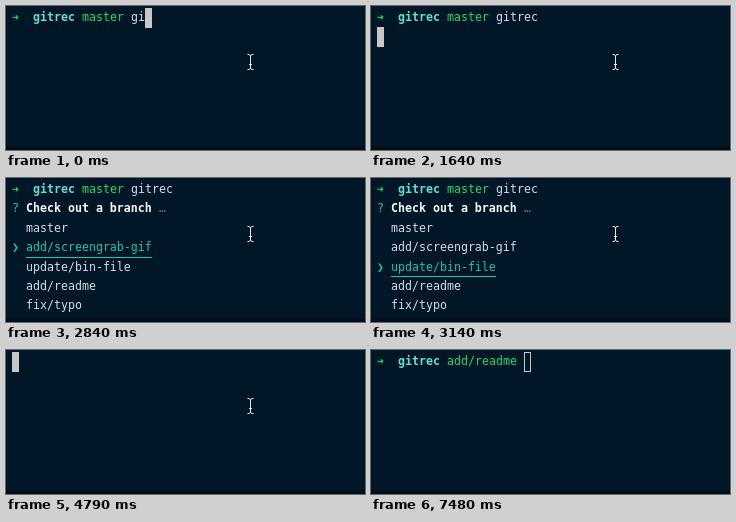
Write an HTML page that moves like this. It is 359 px wide and 144 px high and loops after 7580 ms.

```html
<!DOCTYPE html>
<html lang="en">
<head>
<meta charset="utf-8">
<title>Branch picker in a terminal</title>
<style>
  html, body { margin: 0; width: 100%; height: 100%; overflow: hidden; background: #011627; }
  svg { display: block; width: 359px; height: 144px; }
  text { font: 11.627px "DejaVu Sans Mono", "Liberation Mono", monospace; white-space: pre; fill: #d6deeb; }
  .bold { font-weight: bold; }
  .green { fill: #22da6e; }
  .cyan { fill: #66dfce; }
  .teal { fill: #21c7a8; }
  .white { fill: #f4f7fa; }
  .gray { fill: #6a737d; }
  .block { fill: #c7c7c7; }
  .hollow { fill: none; stroke: #c7c7c7; }
  #pointer { fill: none; stroke: #e6e9ec; }
</style>
</head>
<body>
<svg viewBox="0 0 359 144">
  <rect width="359" height="144" fill="#011627"/>
  <rect y="140" width="359" height="4" fill="#000d1b"/>
  <g id="screen"></g>
  <g id="pointer">
    <path d="M0.5 .5H2Q3.5 .8 3.5 2.5Q3.5 .8 5 .5H6.5M3.5 2V14M0.5 15.5H2Q3.5 15.2 3.5 13.5Q3.5 15.2 5 15.5H6.5M2 10.5H5"/>
  </g>
</svg>
<script>
const LOOP = 7580, LEFT = 6, CELL = 7, ROW = 19.4;
const branches = ["master", "add/screengrab-gif", "update/bin-file", "add/readme", "fix/typo"];
const screenEl = document.getElementById("screen");
const pointerEl = document.getElementById("pointer");

const colX = col => LEFT + col * CELL;

const put = (col, row, str, cls = "") =>
  `<text x="${colX(col)}" y="${15 + row * ROW}" class="${cls}">${str}</text>`;

const cursor = (col, row = 0) =>
  `<rect class="block" x="${colX(col)}" y="${Math.floor(2 + row * ROW)}" width="7" height="20"/>`;

const hollowCursor = col =>
  `<rect class="hollow" x="${colX(col) + 0.5}" y="2.5" width="6" height="19"/>`;

const prompt = (branch, cmd = "") =>
  put(0, 0, "➜", "bold green") + put(3, 0, "gitrec", "bold cyan") +
  put(10, 0, branch, "green") + put(11 + branch.length, 0, cmd);

const typed = n => prompt("master", "gitrec".slice(0, n));
const typing = n => typed(n) + cursor(17 + n);

function menu(selected) {
  const list = branches.map((name, i) => {
    const row = i + 2;
    if (i !== selected) return put(2, row, name);
    const y = Math.floor(21.2 + row * ROW);
    return put(0, row, "❯", "teal") + put(2, row, name, "teal") +
      `<rect class="teal" x="${colX(2)}" y="${y}" width="${name.length * CELL}" height="1"/>`;
  });
  return typed(6) + put(0, 1, "?", "teal") +
    put(2, 1, "Check out a branch", "bold white") + put(21, 1, "…", "gray") + list.join("");
}

const steps = [
  [0, typing(2)],
  [150, typing(3)],
  [300, typing(4)],
  [600, typing(5)],
  [890, typing(6)],
  [1640, typed(6) + cursor(0, 1)],
  [1790, menu(0)],
  [2840, menu(1)],
  [3140, menu(2)],
  [3590, menu(3)],
  [4790, cursor(0)],
  [4940, prompt("add/readme") + cursor(21)],
  [7480, prompt("add/readme") + hollowCursor(21)]
];

const moves = [
  [0, [241, 48]],
  [6430, [266, 43]],
  [6580, [318, 49]],
  [6730, null]
];

const at = (table, t) => table.findLast(([start]) => start <= t)[1];

let shown;
function draw(t) {
  const view = at(steps, t);
  if (view !== shown) screenEl.innerHTML = shown = view;
  const pos = at(moves, t);
  pointerEl.setAttribute("visibility", pos ? "visible" : "hidden");
  if (pos) pointerEl.setAttribute("transform", `translate(${pos})`);
}

const start = performance.now();
function tick() {
  draw((performance.now() - start) % LOOP);
  requestAnimationFrame(tick);
}
tick();
</script>
</body>
</html>
```
